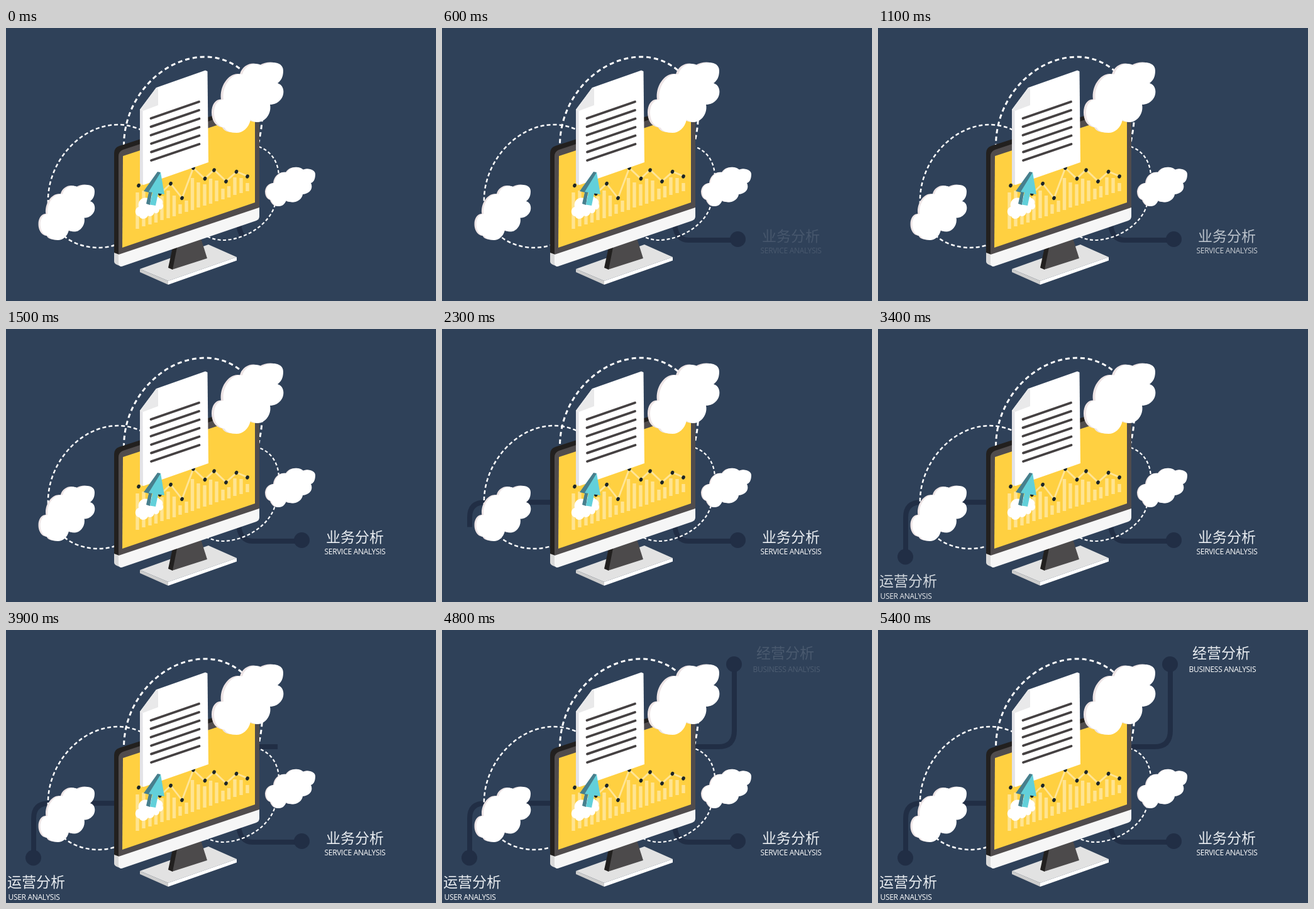
These frames come from a looping animation (684 by 435 pixels, 8 s). An HTML page without scripts:

```html
<!DOCTYPE html>
<html lang="zh-CN">
<head>
<meta charset="utf-8">
<title>Cloud analysis</title>
<style>
html, body { margin: 0; width: 100%; height: 100%; overflow: hidden; background: #2f4159; }
svg { display: block; width: 100%; height: 100%; }

/* Everything shares one 8 s clock and moves in 100 ms ticks. */
.link, .dot, .label, .arc { animation: 8s -.02s infinite both; }

.link { fill: none; stroke: #212e45; stroke-width: 8; stroke-dasharray: 1 2; }
.dot { fill: #212e45; }
.service .link { animation-name: draw1; }
.service .dot { animation-name: pop1; }
.service .label { animation-name: fade1; }
.user .link { animation-name: draw2; }
.user .dot { animation-name: pop2; }
.user .label { animation-name: fade2; }
.business .link { animation-name: draw3; }
.business .dot { animation-name: pop3; }
.business .label { animation-name: fade3; }

@keyframes draw1 {
  0% { stroke-dashoffset: 1; animation-timing-function: steps(5, start); }
  6.25%, 100% { stroke-dashoffset: 0; }
}
@keyframes draw2 {
  0%, 21.25% { stroke-dashoffset: 1; animation-timing-function: steps(9, start); }
  32.5%, 100% { stroke-dashoffset: 0; }
}
@keyframes draw3 {
  0%, 46.25% { stroke-dashoffset: 1; animation-timing-function: steps(9, start); }
  57.5%, 100% { stroke-dashoffset: 0; }
}
@keyframes pop1 {
  0% { opacity: 0; animation-timing-function: step-end; }
  5%, 100% { opacity: 1; }
}
@keyframes pop2 {
  0% { opacity: 0; animation-timing-function: step-end; }
  31.25%, 100% { opacity: 1; }
}
@keyframes pop3 {
  0% { opacity: 0; animation-timing-function: step-end; }
  56.25%, 100% { opacity: 1; }
}
@keyframes fade1 {
  0%, 7.5% { opacity: 0; animation-timing-function: steps(8, start); }
  17.5%, 100% { opacity: 1; }
}
@keyframes fade2 {
  0%, 33.75% { opacity: 0; animation-timing-function: steps(9, start); }
  45%, 100% { opacity: 1; }
}
@keyframes fade3 {
  0%, 60% { opacity: 0; animation-timing-function: steps(7, start); }
  68.75%, 100% { opacity: 1; }
}

.arc { fill: none; stroke: #fff; stroke-width: 2.5; stroke-dasharray: 6 4; animation-name: march; }
.arc.big { stroke-width: 3; stroke-dasharray: 7 5; }
.arc.small { stroke-width: 2.2; stroke-dasharray: 5 3.5; }
@keyframes march {
  0% { stroke-dashoffset: 0; animation-timing-function: steps(54); }
  67.5%, 100% { stroke-dashoffset: -40px; }
}

.label { fill: #fff; }
.zh { font: 23px "Noto Sans CJK SC", "Noto Sans CJK", sans-serif; fill: #e9edf1; }
.en { font: 500 12px "Open Sans", sans-serif; letter-spacing: -.3px; }
.shade { fill: #ede4e5; }
</style>
</head>
<body>
<svg viewBox="0 0 684 435">
  <defs>
    <path id="puff" d="M346 114C343 92 360 70 376 74C380 58 398 53 407 60C420 52 441 53 441 68C441 79 437 84 432 88C443 91 444 106 437 114C432 120 426 122 420 122C423 136 412 150 401 150C395 150 391 148 389 146C386 160 376 167 367 167C357 167 350 164 348 159C336 157 331 146 331 135C331 123 337 114 346 114Z"/>
    <g id="cloud">
      <use href="#puff" x="-4" y="-.5" class="shade"/>
      <use href="#puff" fill="#fff"/>
    </g>
    <path id="wisp" d="M427 247C428 236 437 228 447 230C452 221 466 219 473 226C482 222 492 226 492 233C492 241 489 246 485 247C489 255 484 264 472 265C471 273 462 279 453 277C449 277 447 275 446 274C444 280 440 284 434 284C428 284 424 280 422 274C416 272 414 266 414 260C415 252 421 247 427 247Z"/>
    <ellipse id="mark" rx="2.7" ry="3.2" transform="rotate(25)" fill="#1c2528"/>
  </defs>

  <rect width="684" height="435" fill="#2f4159"/>

  <g class="service">
    <path class="link" pathLength="1" d="M370 308C370 327 378 338 392 338H471"/>
    <circle class="dot" cx="470.5" cy="336.5" r="12.5"/>
    <g class="label">
      <text class="zh" x="509" y="340">业务分析</text>
      <text class="en" x="506.5" y="359">SERVICE ANALYSIS</text>
    </g>
  </g>
  <g class="user">
    <path class="link" pathLength="1" d="M180 276H69Q44 276 44 300V363"/>
    <circle class="dot" cx="43.5" cy="363" r="12.5"/>
    <g class="label">
      <text class="zh" x="2" y="410">运营分析</text>
      <text class="en" x="3.5" y="430">USER ANALYSIS</text>
    </g>
  </g>
  <g class="business">
    <path class="link" pathLength="1" d="M355 186H440Q465 186 465 160V55"/>
    <circle class="dot" cx="464.5" cy="54.5" r="12.5"/>
    <g class="label">
      <text class="zh" x="500" y="45">经营分析</text>
      <text class="en" x="494.5" y="67">BUSINESS ANALYSIS</text>
    </g>
  </g>

  <path class="arc big" d="M187.5 188C187 110 250 46 317 46C372 46 414 95 407 150C406 163 404 172 402 182"/>
  <path class="arc" d="M67 280C64 215 118 154 178 154C191 154 203 157 214 162"/>
  <path class="arc" d="M92 331C106 344 128 350 146 350C155 350 164 349 173 346"/>
  <path class="arc small" d="M402 189C422 196 434 214 434 238"/>
  <path class="arc small" d="M428 281C420 312 382 337 346 338C337 338 328 336 320 332"/>

  <!-- stand -->
  <path fill="#e2e2e2" d="M213 384L322 345L367 365L258 403Z"/>
  <path fill="#fff" d="M258 403L367 365V370.5L258 409Z"/>
  <path fill="#cdcdcd" d="M213 384L258 403V409L213 389Z"/>
  <path fill="#4c4a4b" d="M270 345L309 332L320 367L264 385Z"/>
  <path fill="#22201f" d="M266 345H273L265 385L258 382Z"/>

  <!-- monitor -->
  <path fill="#22201f" d="M172 359V199Q172 191 180 188L396 118L403 122V287L179 362Z"/>
  <path fill="#504c4d" d="M179 361V204Q179 197 186 194L396 124Q403 121 403 128V287Z"/>
  <path fill="#ffd041" d="M186 204L396 135V278L185 350Z"/>
  <path fill="#d9d9d9" d="M172 358L180 361L183 380L176 377Q172 375 172 372Z"/>
  <path fill="#f6f6f6" d="M179 361L403 286V300Q403 305 398 307L184 380Q179 380 179 374Z"/>

  <!-- chart -->
  <path stroke="#fff" stroke-opacity=".42" stroke-width="5.4" d="M209 262V320M219 259V316M229 262V313M238.5 264V310M248 268V306M258 259V303M267.5 267V300M277 281V296M287 275V293M296.5 239V290M306 246V286M316 249V283M325.5 240V280M335 243V276M345 256V273M354.5 252V270M364 238V266M374 239V263M384 247V260"/>
  <path fill="none" stroke="#ffe597" stroke-width="2.8" d="M211 251L228 244L245 264L262 248L280 271L298 223L316 240L331 226L350 244L367 229L384 236"/>
  <use href="#mark" x="211" y="251"/>
  <use href="#mark" x="245" y="264"/>
  <use href="#mark" x="262" y="248"/>
  <use href="#mark" x="280" y="271"/>
  <use href="#mark" x="298" y="223"/>
  <use href="#mark" x="316.5" y="240"/>
  <use href="#mark" x="331" y="226.5"/>
  <use href="#mark" x="350" y="244.5"/>
  <use href="#mark" x="366.5" y="229"/>
  <use href="#mark" x="384" y="236.5"/>

  <!-- document -->
  <path fill="#fff" d="M213 130L239 95L317 67.5L320.5 69L322 214L219 250L213 247Z"/>
  <path fill="#e3e3e7" d="M213 130L217.5 132L218 250L213 247Z"/>
  <path fill="#e9e9ea" d="M213 130L239 95L242 96V123L218 132Z"/>
  <path stroke="#454142" stroke-width="3.8" stroke-linecap="round" d="M230.5 144L307 117.5M230.5 157.4L307 131M230.5 170.8L307.5 144.5M231 184.2L307.5 158M231 197.6L307.5 171.5M231 211L307.5 185"/>

  <!-- upload arrow -->
  <path fill="#fff" d="M211 285C209 275 217 269 225 271C230 266 241 266 244 271C249 273 250 277 249 280C252 285 248 290 244 289C244 294 239 297 236 294C234 300 229 301 226 299C223 305 214 306 212 300C204 299 204 287 211 285Z"/>
  <path fill="#477f8d" d="M241 229L246 230L232 263L229 282L223 280L227 262L219 260Z"/>
  <path fill="#62d0da" d="M246 230L252 265L242 263.500L238 283L229 281.500L233 262L227 261Z"/>

  <use href="#cloud"/>
  <use href="#cloud" transform="translate(-205.2 206.8) scale(.785)"/>
  <use href="#wisp" x="-2" class="shade"/>
  <use href="#wisp" fill="#fff"/>
</svg>
</body>
</html>
```
